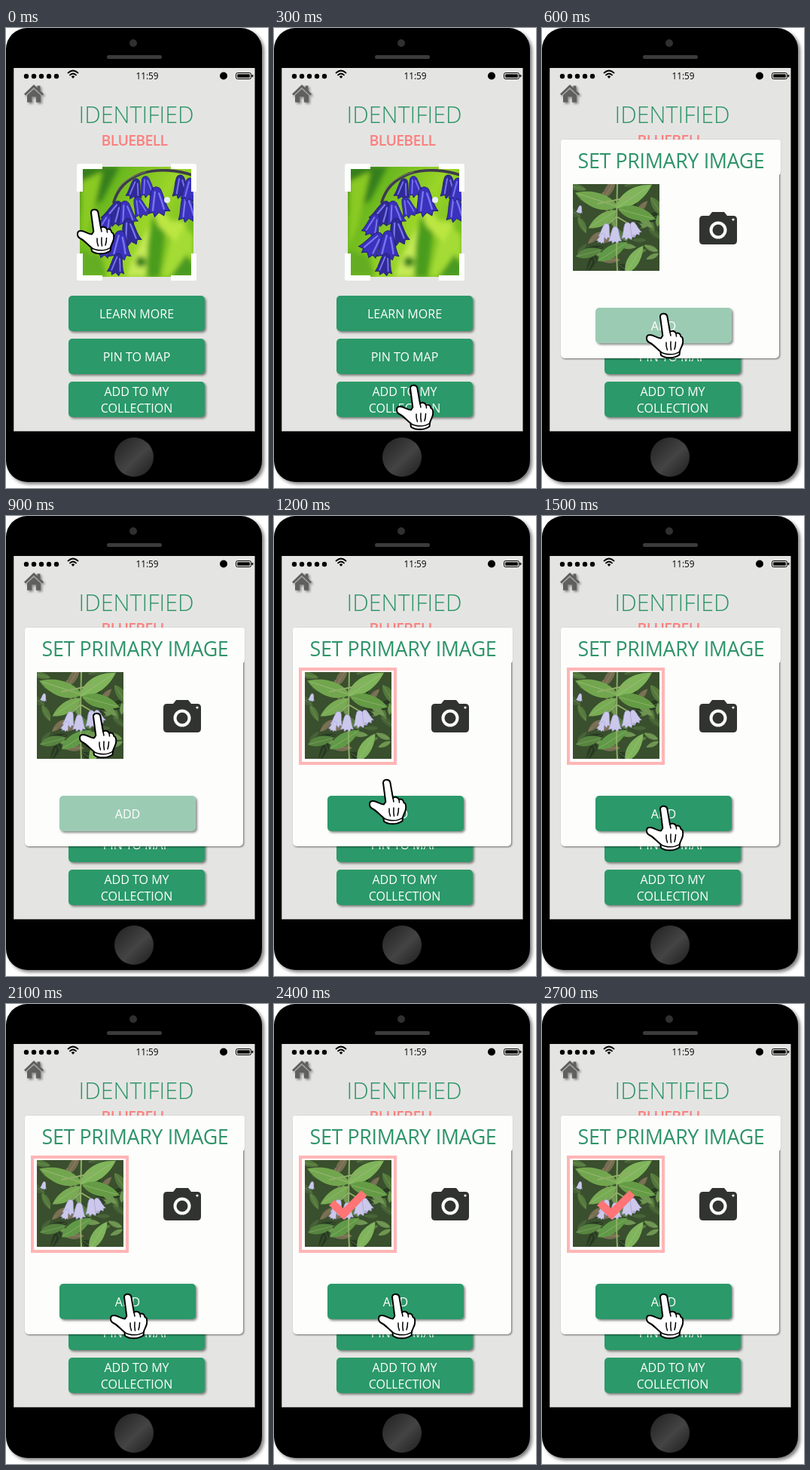
Animation, 348 px wide and 610 px high, one loop 3000 ms. Source, as an HTML page:

```html
<!DOCTYPE html>
<html lang="en">
<head>
<meta charset="utf-8">
<title>Plant identifier</title>
<style>
  html, body { margin: 0; width: 100%; height: 100%; overflow: hidden; background: #fff; }
  svg { display: block; width: 348px; height: 610px; }
  text { font-family: "Open Sans", "Noto Sans", sans-serif; text-anchor: middle; }
  .btn rect { fill: #2b9969; filter: drop-shadow(2px 2px 1.5px rgba(0,0,0,.45)); }
  .btn text { fill: #fff; font-size: 16px; }
  .title { fill: #2f9468; }
  .line { fill: none; stroke-linecap: round; stroke-linejoin: round; }
</style>
</head>
<body>
<svg viewBox="0 0 348 610">
  <defs>
    <linearGradient id="knob" x1="0" y1="0" x2="1" y2="1">
      <stop offset="0" stop-color="#202020"/><stop offset=".55" stop-color="#444"/><stop offset="1" stop-color="#1c1c1c"/>
    </linearGradient>
    <linearGradient id="meadow" x1="0" y1="0" x2="1" y2=".6">
      <stop offset="0" stop-color="#3d8d1a"/><stop offset=".3" stop-color="#6cb81f"/>
      <stop offset=".65" stop-color="#9bd528"/><stop offset="1" stop-color="#73bb20"/>
    </linearGradient>
    <filter id="soft" x="-30%" y="-30%" width="160%" height="160%"><feGaussianBlur stdDeviation="3"/></filter>
    <clipPath id="clipA"><rect x="98" y="184" width="151" height="146"/></clipPath>
    <clipPath id="clipB"><rect x="41" y="207" width="115" height="115"/></clipPath>
    <path id="bell" d="M-4 -14C0 -18 5 -16 6 -11C8 -4 8 4 12 11L7 10L5 15L0 11L-5 15L-6 10L-12 11C-8 4 -8 -6 -4 -14Z"/>
    <path id="leaf" d="M0 0C12 -13 34 -13 52 0C34 11 12 11 0 0Z"/>
  </defs>

  <!-- phone -->
  <rect width="340" height="602" rx="28" style="filter:drop-shadow(3px 3px 2px rgba(0,0,0,.5))"/>
  <circle cx="169" cy="20" r="5" fill="#303030"/>
  <rect x="134" y="36" width="73" height="5" rx="2.5" fill="#3b3b3b"/>
  <rect x="10.5" y="53" width="320" height="482" fill="#e4e5e2"/>
  <path d="M10.5 53V534.5H330" fill="none" stroke="#aaa"/>
  <circle cx="170" cy="569" r="26" fill="url(#knob)"/>

  <!-- status bar -->
  <g id="dots"></g>
  <g class="line" stroke="#000" stroke-width="1.8">
    <path d="M82.5 59.5Q89 53.5 95.5 59.5M85 62.3Q89 58.7 93 62.3"/>
  </g>
  <path d="M86.7 64.3Q89 62.3 91.3 64.3L89 67Z"/>
  <text x="187.5" y="67.5" font-size="11.8">11:59</text>
  <circle cx="289" cy="63.5" r="5"/>
  <rect x="305.5" y="59.5" width="20" height="8" rx="2" fill="none" stroke="#000"/>
  <rect x="307.2" y="61.2" width="16.6" height="4.6" rx=".6"/>
  <rect x="326.5" y="61.7" width="1.8" height="3.6" rx=".8"/>

  <!-- home icon -->
  <g fill="#606060" style="filter:drop-shadow(2px 2px 1.5px rgba(0,0,0,.4))">
    <path d="M24 87.5L37 75L41.5 79.2V76.5H45.5V83L50 87.5L48 89.5L37 79L26 89.5Z"/>
    <path d="M28 89.3L37 81L46 89.3V98.5H39.8V91H34.2V98.5H28Z"/>
  </g>

  <text class="title" x="173" y="126" font-size="30.5" font-weight="300">IDENTIFIED</text>
  <text x="170.5" y="156" font-size="19.5" font-weight="600" letter-spacing="-.7" fill="#fb8080">BLUEBELL</text>

  <!-- bluebell picture -->
  <g clip-path="url(#clipA)">
    <rect x="98" y="184" width="151" height="146" fill="url(#meadow)"/>
    <g filter="url(#soft)">
      <path d="M98 184H150L128 228L98 246Z" fill="#347f1c"/>
      <path d="M100 204L128 190L112 262L99 292Z" fill="#8aca24"/>
      <path d="M180 330L196 246L213 258L204 330Z" fill="#489c1e"/>
      <path d="M206 330L226 252L249 275V330Z" fill="#a4dc35"/>
      <path d="M166 310L190 262L186 330H160Z" fill="#c4ea57"/>
      <path d="M98 294L126 302L134 330H98Z" fill="#64ad20"/>
      <path d="M218 330L240 300L249 312V330Z" fill="#4a9a20"/>
      <path d="M186 220L220 256L240 258L224 284L202 262Z" fill="#bce642"/>
      <circle cx="179" cy="310" r="7" fill="#2f7d19"/>
    </g>
    <path d="M143 231C149 212 160 201 180 193C202 186 228 188 250 196" class="line" stroke="#3d3b4b" stroke-width="3.6"/>
    <path d="M148 215C154 204 168 196 185 191" class="line" stroke="#76766a" stroke-width="1.3"/>
    <g id="bells"></g>
    <circle cx="214" cy="228" r="4" fill="#e9edff"/>
  </g>
  <path fill="#fdfffc" d="M97 180H128V187H102V217H94V183Q94 180 97 180ZM219 180H250Q253 180 253 183V217H246V187H219ZM94 299H102V328H128V335H97Q94 335 94 332ZM253 299V332Q253 335 250 335H219V328H246V299Z"/>

  <g id="menu"></g>

  <!-- dialog -->
  <g id="dialog" opacity="0">
    <rect x="25" y="148" width="290" height="290" rx="5" fill="#fdfefc" style="filter:drop-shadow(1.5px 1.5px 1px rgba(0,0,0,.55))"/>
    <rect x="25" y="148" width="292" height="47" rx="4" fill="#fdfefc"/>
    <text class="title" x="171.5" y="186" font-size="26.8" letter-spacing="-.35">SET PRIMARY IMAGE</text>
    <rect id="frame" x="35" y="203" width="126" height="125" fill="none" stroke="#ffb5b5" stroke-width="4" opacity="0"/>
    <g clip-path="url(#clipB)">
      <rect x="41" y="207" width="115" height="115" fill="#394f2d"/>
      <g id="leaves"></g>
      <path d="M100 322C98 288 99 256 100 207M74 233L118 224M99 250L86 262M99 250L119 262" class="line" stroke="#8fae67" stroke-width="2"/>
      <g id="blooms"></g>
    </g>
    <path id="check" d="M73 267L80 260L92 271L116 247L123.5 254L92.5 286Z" fill="#ff7474" opacity="0"/>
    <path fill="#313331" d="M214 249H222L226 244H242L246 249H254Q259 249 259 254V282Q259 287 254 287H214Q209 287 209 282V254Q209 249 214 249Z"/>
    <circle cx="234" cy="268" r="9.5" fill="none" stroke="#fdfefc" stroke-width="4"/>
    <circle cx="254" cy="254" r="1.6" fill="#fdfefc"/>
    <g id="add"></g>
  </g>

  <g id="hand">
    <path d="M19 5C19 -.5 27 -.5 28.3 4L32 25C35 22.5 39 24 40 27C43.500 25.500 46 28 46.300 31C49.500 31.500 49.500 36 49 40C48 45 45.500 47 45 51L44.500 55.500C37 60.500 26 60.500 20 56L19.300 51C14 47 10 41.500 4.500 39C-.5 36.500 0 29 5 29C10 28.500 14 33 20 33.500L22.300 30Z" fill="#fff" stroke="#000" stroke-width="2" stroke-linejoin="round"/>
    <path d="M19.500 51.500C27 56 38 56 45 51M27 39Q26.500 44 28.500 49M33 38Q32.500 44 33.500 49M39.500 38.500Q39.500 44 38 48M32 25L33 30M40 27L40.500 31" class="line" stroke="#000" stroke-width="1.5"/>
  </g>
</svg>
<script>
const NS = 'http://www.w3.org/2000/svg';
const get = id => document.getElementById(id);

function put(parent, tag, attrs, text = '') {
  const el = document.createElementNS(NS, tag);
  for (const k in attrs) el.setAttribute(k, attrs[k]);
  el.textContent = text;
  parent.append(el);
  return el;
}

function button(parent, x, y, ...lines) {
  const g = put(parent, 'g', { class: 'btn' });
  const face = put(g, 'rect', { x, y, width: 181, height: 47, rx: 5 });
  const top = y + (lines.length > 1 ? 19 : 30);
  lines.forEach((s, i) => put(g, 'text', { x: x + 90.5, y: top + i * 21.5 }, s));
  return face;
}

for (let i = 0; i < 5; i++) put(get('dots'), 'circle', { cx: 27 + i * 10, cy: 64, r: 3.2 });

button(get('menu'), 83, 355, 'LEARN MORE');
button(get('menu'), 83, 412, 'PIN TO MAP');
button(get('menu'), 83, 469, 'ADD TO MY', 'COLLECTION');
const addFace = button(get('add'), 71, 371, 'ADD');

// x, y, angle, scale
const bells = [
  [171, 214, 8, .9], [187, 211, -12, .9], [201, 231, -8, 1.25], [232, 211, -5, 1],
  [241, 240, -8, 1.15], [244, 215, 0, 1], [143, 246, 25, 1.1], [160, 247, -12, 1.1],
  [131, 262, 18, 1], [164, 271, -12, 1.15], [131, 287, 35, 1.15], [151, 289, 0, 1.25],
  [147, 314, 8, .95], [178, 238, -22, .9]
];
bells.forEach(([x, y, a, s], i) => {
  const g = put(get('bells'), 'g', { transform: `translate(${x} ${y}) rotate(${a}) scale(${s})` });
  put(g, 'use', { href: '#bell', fill: i % 3 ? '#3a31bd' : '#302a98', stroke: '#25216f', 'stroke-width': .8 });
  put(g, 'path', { d: 'M-1 -11Q-4 0 -6 8M3 -9Q5 0 6 8', class: 'line', stroke: '#7775ec', 'stroke-width': 2 });
});

let seed = 11;
const rnd = () => (seed = seed * 16807 % 2147483647) / 2147483647;
const greens = ['#54783c', '#283b22', '#6c9350', '#435f34', '#776d52'];
function leaf(x, y, a, s, fill) {
  const g = put(get('leaves'), 'g', { transform: `translate(${x} ${y}) rotate(${a}) scale(${s})` });
  put(g, 'use', { href: '#leaf', fill });
  put(g, 'path', { d: 'M2 0H48', stroke: '#b1ca8a', 'stroke-width': .8, opacity: .55 });
}
for (let i = 0; i < 42; i++) {
  leaf(35 + rnd() * 120, 207 + rnd() * 115, rnd() * 360, .25 + rnd() * .4, greens[i % 5]);
}
leaf(101, 237, 198, 1.15, '#72a64e');
leaf(98, 239, -33, 1.1, '#80b55b');
leaf(101, 240, 15, 1, '#659b45');
leaf(99, 242, 148, .85, '#78ab54');
leaf(74, 309, -32, .9, '#609947');
leaf(111, 326, -58, .85, '#7fb45c');
leaf(45, 303, -14, .7, '#568440');

[[84, 270, 10, .68], [97, 275, 0, .72], [114, 270, -5, .75], [123, 267, -22, .62],
 [50, 241, 10, .35], [79, 279, 20, .45]].forEach(([x, y, a, s]) =>
  put(get('blooms'), 'use', { href: '#bell', fill: '#cbc8ec', stroke: '#9794c5', 'stroke-width': .8,
    transform: `translate(${x} ${y}) rotate(${a}) scale(${s})` }));

// hard steps: [time in ms, value]
const LOOP = 3000;
function steps(el, prop, list) {
  const frames = list.map(([t, v]) => ({ offset: t / LOOP, [prop]: v, easing: 'step-end' }));
  frames.push({ offset: 1, [prop]: list[list.length - 1][1] });
  el.animate(frames, { duration: LOOP, iterations: Infinity });
}
const at = (x, y) => `translate(${x}px, ${y}px)`;

steps(get('hand'), 'transform', [
  [0, at(94, 240)], [300, at(162, 473)], [600, at(138, 378)],
  [900, at(97, 261)], [1200, at(126, 349)], [1500, at(138, 384)]
]);
steps(get('dialog'), 'opacity', [[0, 0], [600, 1]]);
steps(get('frame'), 'opacity', [[0, 0], [1200, 1]]);
steps(get('check'), 'opacity', [[0, 0], [2400, 1]]);
steps(addFace, 'fill', [[0, '#9ccbb4'], [1200, '#2b9969']]);
</script>
</body>
</html>
```
